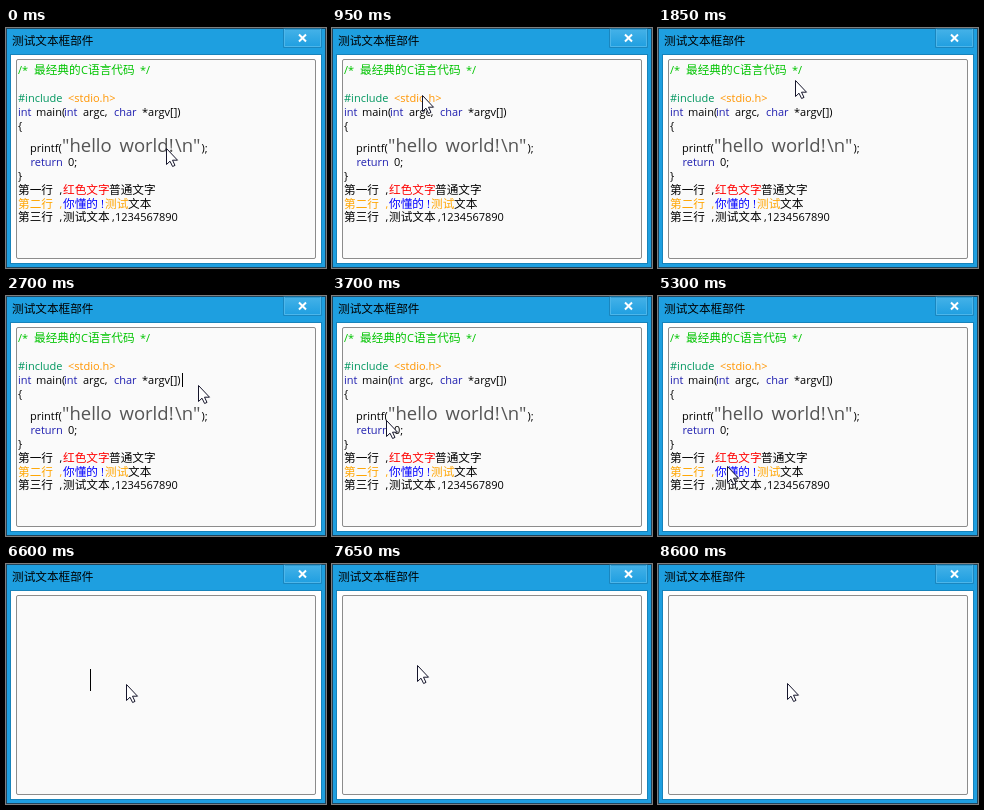
An HTML page that plays this animation: 320x240 px, repeating every 8.65 s.

```html
<!DOCTYPE html>
<html lang="zh">
<head>
<meta charset="utf-8">
<style>
html, body { margin: 0; width: 100%; height: 100%; overflow: hidden; background: #1e9fe0; }
svg { display: block; width: 100vw; height: 100vh; }
text { font: 11px "Open Sans", "Noto Sans CJK SC", "Noto Sans CJK", sans-serif; white-space: pre; }
text.cjk { font: 11.65px "Noto Sans CJK SC", "Noto Sans CJK", sans-serif; }
text.big { font-size: 18.5px; }
</style>
</head>
<body>
<svg viewBox="0 0 320 240">
  <defs>
    <linearGradient id="btn" x1="0" y1="0" x2="0" y2="1">
      <stop offset="0" stop-color="#45b2e8"/>
      <stop offset="1" stop-color="#1e9ee0"/>
    </linearGradient>
  </defs>
  <rect width="320" height="240" fill="#1e9fe0"/>
  <rect x=".5" y=".5" width="319" height="239" fill="none" stroke="#20455c"/>
  <rect x="4.5" y="26.5" width="311" height="209" fill="#fff" stroke="#1783bb"/>
  <rect x="10.5" y="31.5" width="299" height="199" rx="1.5" fill="#fafafa" stroke="#8c8c8c"/>
  <path d="M277.5 1V19.5H315.5V1Z" fill="url(#btn)" stroke="#1a86bf"/>
  <path d="M278.5 1V18.5H314.5V1" fill="none" stroke="#4db6ea"/>
  <path d="M293 6.5L300 13.5M300 6.5L293 13.5" stroke="#fff" stroke-width="2"/>
  <text class="cjk" x="6" y="17">测试文本框部件</text>
  <g id="doc"></g>
  <rect id="caret" width="1" fill="#000"/>
  <path id="mouse" d="M.5 .5V16.5L4 13.2L6.6 18.5L9 17.4L6.5 12.2H11.5Z" fill="#fff" stroke="#15152b"/>
</svg>
<script>
const LOOP = 8650, STEP = 50, WIPE = 6100;
const $ = id => document.getElementById(id);
const green = "#00c400", teal = "#00965f", orange = "#ff9500", key = "#2020b0",
      gray = "#555", red = "#f00", blue = "#00f", amber = "#ffa500", black = "#000";

// each line: baseline, then runs of [x, text, colour, class]
const lines = [
  [46, [12, "/*", green], [28, "最经典的", green, "cjk"], [75, "C", green],
       [82, "语言代码", green, "cjk"], [134, "*/", green]],
  [74, [12, "#include", teal], [62, "<stdio.h>", orange]],
  [88, [12, "int", key], [30, "main(", black], [58, "int", key], [77, "argc,", black],
       [108, "char", key], [136, "*argv[])", black]],
  [102, [12, "{", black]],
  [124, [24, "printf(", black], [56, '"hello', gray, "big"], [113.5, "world!", gray, "big"],
        [169, '\\n"', gray, "big"], [195.5, ");", black]],
  [138, [24.5, "return", key], [62, "0;", black]],
  [152, [12, "}", black]],
  [166, [12, "第一行", black, "cjk"], [53.5, ",", black], [57, "红色文字", red, "cjk"],
        [103, "普通文字", black, "cjk"]],
  [180, [12, "第二行", amber, "cjk"], [53.5, ",", amber], [57, "你懂的", blue, "cjk"],
        [95, "!", blue], [99, "测试", amber, "cjk"], [122, "文本", black, "cjk"]],
  [193, [12, "第三行", black, "cjk"], [53.5, ",", black], [57, "测试文本", black, "cjk"],
        [106, ",", black], [109, "1234567890", black]]
];

for (const [y, ...runs] of lines) {
  for (const [x, str, fill, cls] of runs) {
    const el = document.createElementNS("http://www.w3.org/2000/svg", "text");
    el.setAttribute("x", x);
    el.setAttribute("y", y);
    el.setAttribute("fill", fill);
    if (cls) el.setAttribute("class", cls);
    el.textContent = str;
    $("doc").append(el);
  }
}

// pointer path: time, x, y
const path = [
  [0, 160, 120], [250, 160, 120], [600, 66, 72], [800, 66, 72], [850, 61, 72],
  [950, 90, 67], [1350, 120, 52], [1500, 120, 52], [1550, 129, 59], [1750, 129, 59],
  [2000, 150, 42], [2300, 169, 84], [2400, 169, 84], [2450, 186, 84], [2650, 186, 84],
  [2700, 192, 89], [2750, 198, 92], [3000, 104, 108], [3100, 104, 108], [3350, 40, 84],
  [3450, 16, 92], [3700, 54, 124], [4000, 62, 159], [4450, 153, 174], [4550, 153, 174],
  [4600, 154, 175], [5300, 69, 170], [5450, 55, 177], [5550, 37, 177], [5650, 37, 177],
  [6250, 84, 115], [6500, 120, 120], [6600, 120, 120], [6850, 153, 119], [7200, 153, 119],
  [8100, 16, 83], [8250, 16, 83], [8500, 122, 122], [8600, 129, 119], [LOOP, 129, 119]
];

// caret: from, to, x, y, height
const carets = [
  [1550, 1850, 12, 48, 14], [2100, 2450, 144, 35, 13], [2700, 2900, 176, 77, 14],
  [3350, 3600, 40, 77, 14], [3950, 4200, 40, 77, 14], [5400, 5550, 57, 169, 14],
  [6600, 6800, 84, 105, 22]
];

function pointAt(t) {
  const i = path.findIndex(p => p[0] > t);
  const a = path[i - 1], b = path[i], k = (t - a[0]) / (b[0] - a[0]);
  return [1, 2].map(n => Math.round(a[n] + (b[n] - a[n]) * k));
}

function draw(ms) {
  const t = Math.floor((ms % LOOP) / STEP) * STEP;
  $("mouse").setAttribute("transform", `translate(${pointAt(t)})`);
  $("doc").setAttribute("visibility", t < WIPE ? "visible" : "hidden");
  const c = carets.find(c => t >= c[0] && t < c[1]);
  $("caret").setAttribute("visibility", c ? "visible" : "hidden");
  if (c) ["x", "y", "height"].forEach((name, i) => $("caret").setAttribute(name, c[i + 2]));
}

let start;
function tick(now) {
  start ??= now;
  draw(Math.max(0, now - start));
  requestAnimationFrame(tick);
}
draw(0);
requestAnimationFrame(tick);
</script>
</body>
</html>
```
